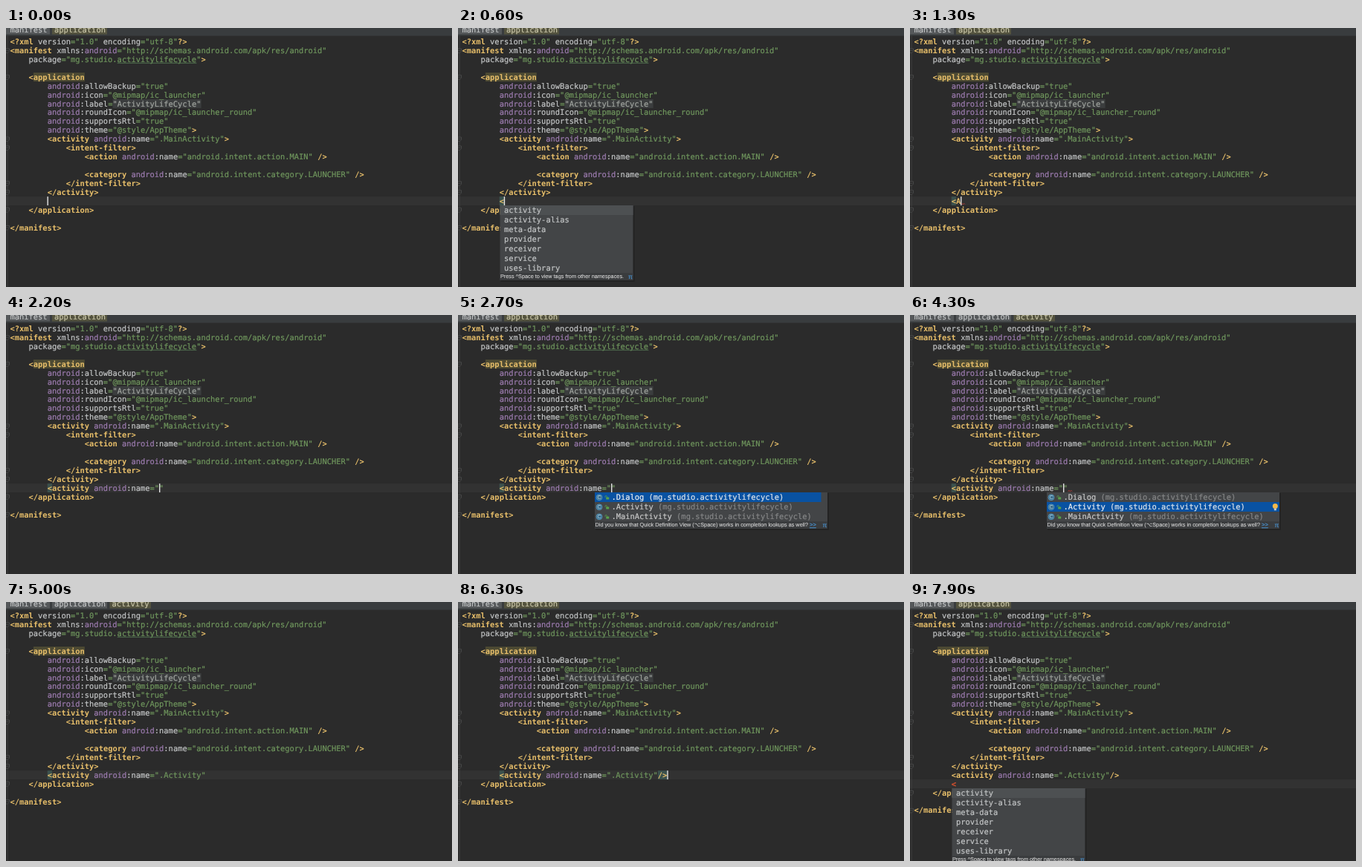
Recreate the animation shown at these times as an HTML page. Size 600 px wide and 349 px high, loop 8000 ms.

```html
<!DOCTYPE html>
<html lang="en">
<head>
<meta charset="utf-8">
<title>Manifest editor</title>
<style>
html, body { margin: 0; width: 100%; height: 100%; overflow: hidden; background: #2b2b2b; }
svg { display: block; width: 600px; height: 349px; text-rendering: geometricPrecision; }
text { white-space: pre; font: 10.42px "DejaVu Sans Mono", monospace; --c: #c3c5c6; }
text, tspan { fill: var(--c); stroke: var(--c); stroke-width: 0.2px; }
.ui { font-family: "Liberation Sans", sans-serif; stroke-width: 0.1px; }
.tag { --c: #e8bf6a; font-weight: bold; stroke-width: 0; }
.ns { --c: #9d7cb0; }
.str { --c: #6f965d; }
.fold { --c: #a0a49f; }
.err { --c: #d0502f; font-weight: bold; }
</style>
</head>
<body>
<svg id="stage" viewBox="0 0 600 349"></svg>
<script>
const LOOP = 8000, LEFT = 5.5, CW = 6.272, LH = 11.93, INDENT = 8;
const stage = document.getElementById('stage');
const rowY = i => 18.4 + i * LH;
const colX = c => LEFT + c * CW;

function add(parent, tag, attrs, text) {
  const e = document.createElementNS('http://www.w3.org/2000/svg', tag);
  for (const k in attrs) e.setAttribute(k, attrs[k]);
  if (text !== undefined) e.textContent = text;
  parent.appendChild(e);
  return e;
}
const box = (p, x, y, width, height, fill) => add(p, 'rect', { x, y, width, height, fill });
const draw = (p, d, stroke, w = 1, fill = 'none') => add(p, 'path', { d, stroke, 'stroke-width': w, fill });
const disc = (p, cx, cy, r, fill) => add(p, 'circle', { cx, cy, r, fill });
const label = (p, x, y, s, style = '', cls = '') => add(p, 'text', { x, y, style, class: cls }, s);
const span = (t, s, style) => add(t, 'tspan', { style }, s);

const TOKEN = /(="[^"]*"?)|(<[\/?]?[\w-]*|[\/?]?>|\/)|(android)|((?:(?!=|<|\/|\?|>|android).)+)/g;

function codeLine(p, row, src, cls) {
  const body = src.trimStart();
  const t = label(p, colX(src.length - body.length), rowY(row) + 3.6, '');
  for (const [s, str, tag, ns] of body.matchAll(TOKEN)) {
    if (str && s.includes('LifeCycle')) {
      add(t, 'tspan', { class: 'str' }, '=');
      add(t, 'tspan', { class: 'fold' }, s.slice(1));
    } else {
      add(t, 'tspan', { class: cls || (str ? 'str' : tag ? 'tag' : ns ? 'ns' : '') }, s);
    }
  }
}

const HEAD = `<?xml version="1.0" encoding="utf-8"?>
<manifest xmlns:android="http://schemas.android.com/apk/res/android"
    package="mg.studio.activitylifecycle">

    <application
        android:allowBackup="true"
        android:icon="@mipmap/ic_launcher"
        android:label="ActivityLifeCycle"
        android:roundIcon="@mipmap/ic_launcher_round"
        android:supportsRtl="true"
        android:theme="@style/AppTheme">
        <activity android:name=".MainActivity">
            <intent-filter>
                <action android:name="android.intent.action.MAIN" />

                <category android:name="android.intent.category.LAUNCHER" />
            </intent-filter>
        </activity>`.split('\n');
const TYPED = HEAD.length;
const TAIL = ['    </application>', '', '</manifest>'];

function foldMark(p, row) {
  const y = rowY(row);
  draw(p, `M-1 ${y - 2.5}H4.5V${y + 1}L2.5 ${y + 3}H-1Z M0 ${y}H3.5`, '#58595a', 0.6, '#2b2b2b');
}

// Pop-ups
const TAGS = ['activity', 'activity-alias', 'meta-data', 'provider', 'receiver', 'service', 'uses-library'];
const SHORT = ['activity', 'activity-alias', 'meta-data', 'uses-library', 'application'];
const NAMES = ['.Dialog', '.Activity', '.MainActivity'];
const PKG = 'mg.studio.activitylifecycle';

function frame(p, x, y, w, h, fill) {
  box(p, x + 1, y + 1, w + 1, h + 1, '#00000030');
  box(p, x, y, w, h, fill);
}

function hintBar(p, x, y, w, text) {
  box(p, x, y, w, 10, '#3a3c3e');
  label(p, x + 0.5, y + 7.3, text, 'font-size:7.3px;--c:#d6d6d6', 'ui');
  label(p, x + w - 6.5, y + 7.5, 'π', 'font-size:8.5px;--c:#4a9be0', 'ui');
}

function tagList(p, y, w, rows, hint) {
  const x = 56.5;
  frame(p, x, y, w, rows.length * 13 + 10, '#434547');
  box(p, x, y, w, 13, '#4d5052');
  rows.forEach((s, i) => label(p, 62, y + i * 13 + 10.1, s));
  hintBar(p, x, y + rows.length * 13, w, hint);
}

function classList(p, sel, bulb) {
  const x = 184, y = 239, w = 313;
  frame(p, x, y, w, 49, '#434547');
  box(p, x, y + sel * 13, bulb ? w : w - 8.5, 13, '#0952a2');
  NAMES.forEach((s, i) => {
    const cy = y + 6.5 + i * 13, on = i === sel;
    add(p, 'circle', { cx: 190, cy: cy + 0.3, r: 3.9, fill: '#3a6c8c', stroke: '#5a9cc0', 'stroke-width': 0.9 });
    label(p, 187.6, cy + 2.9, 'C', 'font-size:7px;--c:#b4d2e0', 'ui');
    box(p, 199.2, cy, 4, 3, '#59a14c');
    draw(p, `M198 ${cy + 0.3}v-1.6q1.2 -1.6 2.4 0v1.4`, '#59a14c', 0.8);
    const t = label(p, 206.4, cy + 3.6, '');
    span(t, s, `--c:${on ? '#eef0f2' : '#c8c8c8'}`);
    span(t, ` (${PKG})`, `--c:${on ? '#dfe5ec' : '#858687'}`);
  });
  hintBar(p, x, y + 39, w, 'Did you know that Quick Definition View (⌥Space) works in completion lookups as well?');
  label(p, 473, 285.4, '>>', 'font-size:7.6px;--c:#4a9be0;text-decoration:underline', 'ui');
  if (bulb) {
    const cy = y + 5.5 + sel * 13;
    disc(p, 491.3, cy, 3.5, '#f2b84b');
    box(p, 489.8, cy + 3.2, 3, 2.6, '#c9c9c9');
  }
}

function docPanel(p) {
  const x = 183.5, y = 126, w = 301.5;
  frame(p, x, y, w, 110, '#444646');
  box(p, x, y, w, 13.5, '#585959');
  label(p, 327.8, 136, 'Documentation for Dialog', 'font-size:8.85px;--c:#919292;text-anchor:middle', 'ui');
  draw(p, 'M475.5 136.5l2.5-2.5m-1.5-1.5l3 3 1.2-1.8 1.8-1.6-2.2-2.2-1.6 1.8z', '#919292', 0.8, '#919292');
  [[192, 0], [208, 180], [224, 90]].forEach(([cx, a]) => {
    const g = add(p, 'g', { transform: `translate(${cx} 150) rotate(${a})` });
    draw(g, 'M4 0H-3M0 -3.4L-3.6 0L0 3.4', '#5d6061', 1.5);
  });
  draw(p, 'M236.5 145.5h5l2 2v7h-7zM238 148.5h3M238 150.5h3', '#b4b6b7', 1);
  draw(p, 'M240 153.5l5-5', '#62b543', 1.8);
  draw(p, 'M260.5 146.5h3.4l1 1.4h4.6v6.4h-9z', '#9aa7b0', 0.5, '#9aa7b0');
  box(p, 265.6, 151, 4, 4, '#4ea3c4');
  label(p, 272, 153.2, 'app', 'font-size:9.2px;--c:#d4d4d4', 'ui');
  const ring = { cx: 477, cy: 150, fill: 'none', stroke: '#3d9bd0', 'stroke-width': 1.5 };
  add(p, 'circle', { ...ring, r: 3.4, 'stroke-dasharray': '1.6 1.07' });
  add(p, 'circle', { ...ring, r: 2.2 });
  draw(p, `M${x} 160.5h${w}`, '#383a3a', 0.8);
  label(p, 185, 169, PKG, 'font-size:8.1px;font-weight:bold;--c:#d0d0d0', 'ui');
  const mono = 'font-size:7.32px;--c:#d0d0d0';
  const t = label(p, 185, 181, 'public class ', mono);
  span(t, 'Dialog', 'font-weight:bold');
  const u = label(p, 185, 190.8, 'extends ', mono);
  span(u, 'AppCompatActivity', '--c:#589df6;text-decoration:underline');
  label(p, 185, 203.3, 'Created by Quillanter on 1/3/18.', 'font-size:8px;--c:#d0d0d0', 'ui');
}

const squiggle = (p, col) => {
  const x = colX(INDENT + col);
  draw(p, `M${x} 237.8l1.5-1.4 1.5 1.4 1.5-1.4 1.2 1.2`, '#c4403c', 0.9);
};

// Each step holds until the next one begins.
const OPEN = '<activity android:name="', EMPTY = OPEN + '"', FULL = OPEN + '.Activity"', DONE = FULL + '/>';
const NS_HINT = 'Press ^Space to view tags from other namespaces.';
const MOVE_HINT = '^↓ and ^↑ will move caret down and up in the editor';
const STEPS = [
  { at: 0, text: '' },
  { at: 300, text: '<' },
  { at: 500, text: '<', pop: g => tagList(g, 239, 179, TAGS, NS_HINT) },
  { at: 1000, text: '<A', err: 2 },
  { at: 1500, text: '<a', err: 2, pop: g => tagList(g, 239, 233, SHORT, MOVE_HINT) },
  { at: 2000, text: EMPTY, col: 24 },
  { at: 2300, text: EMPTY, col: 24, pop: g => classList(g, 0) },
  { at: 2800, text: EMPTY, col: 24, crumb: 1, err: 25, pop: g => classList(g, 0) },
  { at: 3400, text: EMPTY, col: 24, crumb: 1, err: 25, pop: g => { classList(g, 0, 1); docPanel(g); } },
  { at: 3900, text: EMPTY, col: 24, crumb: 1, err: 25, pop: g => classList(g, 1, 1) },
  { at: 4500, text: FULL, col: 33, crumb: 1 },
  { at: 5200, text: FULL, col: 34, crumb: 1 },
  { at: 5700, text: FULL + '/', crumb: 1 },
  { at: 5900, text: DONE },
  { at: 6700, text: DONE, next: '' },
  { at: 7000, text: DONE, next: '<' },
  { at: 7200, text: DONE, next: '<', pop: g => tagList(g, 251, 179, TAGS, NS_HINT) },
  { at: 7700, text: DONE, next: '<', bad: 1, still: 1, pop: g => tagList(g, 251, 179, TAGS, NS_HINT) }
];

function crumbs(p, names) {
  box(p, 0, 0, 600, 10.6, '#393c3e');
  [[0, 59, 5.5], [62, 74, 65], [139.5, 55.5, 142.5]].slice(0, names.length).forEach(([x, w, tx], i) => {
    const last = i === names.length - 1;
    box(p, x, 0, w, 8.6, last ? '#54533f' : '#55585a');
    label(p, tx, 6.3, names[i], `--c:${last ? '#c9c6a8' : '#c3c5c6'}`);
  });
}

function render(s) {
  stage.replaceChildren();
  const fresh = s.next !== undefined, shift = fresh ? 1 : 0;
  const row = TYPED + shift, tail = TYPED + 1 + shift;
  const mark = (r, c, n, fill) => box(stage, colX(c), rowY(r) - 6, n * CW, LH, fill);
  box(stage, 0, 0, 600, 349, '#2b2b2b');
  box(stage, 0, rowY(row) - 6, 600, LH, '#323232');
  draw(stage, 'M2.2 10V349', '#454748', 0.7);
  [1, 4, 11, 12, 16, 17, tail, tail + 2].forEach(r => foldMark(stage, r));
  mark(4, 5, 11, '#4d4a33');
  mark(7, 22, 19, '#3b3d3e');
  if (s.text && !fresh) {
    mark(TYPED, INDENT, 1, '#3b514d');
    if (s.text === DONE) mark(TYPED, INDENT + 34, 2, '#3b514d');
  }
  HEAD.forEach((line, i) => codeLine(stage, i, line));
  draw(stage, `M${colX(23)} ${rowY(2) + 5}h${17 * CW}`, '#567a55', 0.9);
  const pad = ' '.repeat(INDENT);
  codeLine(stage, TYPED, pad + s.text);
  if (fresh) codeLine(stage, row, pad + s.next, s.bad && 'err');
  TAIL.forEach((line, i) => codeLine(stage, tail + i, line));
  if (s.err) squiggle(stage, s.err);
  const col = fresh ? s.next.length : s.col ?? s.text.length;
  const caret = box(stage, colX(INDENT + col) - 0.2, rowY(row) - 6, 1.4, LH, '#e4e4e4');
  crumbs(stage, ['manifest', 'application'].concat(s.crumb ? 'activity' : []));
  if (s.pop) s.pop(stage);
  return caret;
}

let shown, caret;
function tick(now) {
  const t = now % LOOP;
  const step = STEPS.findLast(s => s.at <= t);
  if (step !== shown) {
    caret = render(step);
    shown = step;
  }
  const on = !step.still && (t - step.at) % 1000 < 500;
  caret.setAttribute('visibility', on ? 'visible' : 'hidden');
  requestAnimationFrame(tick);
}
tick(0);
</script>
</body>
</html>
```
